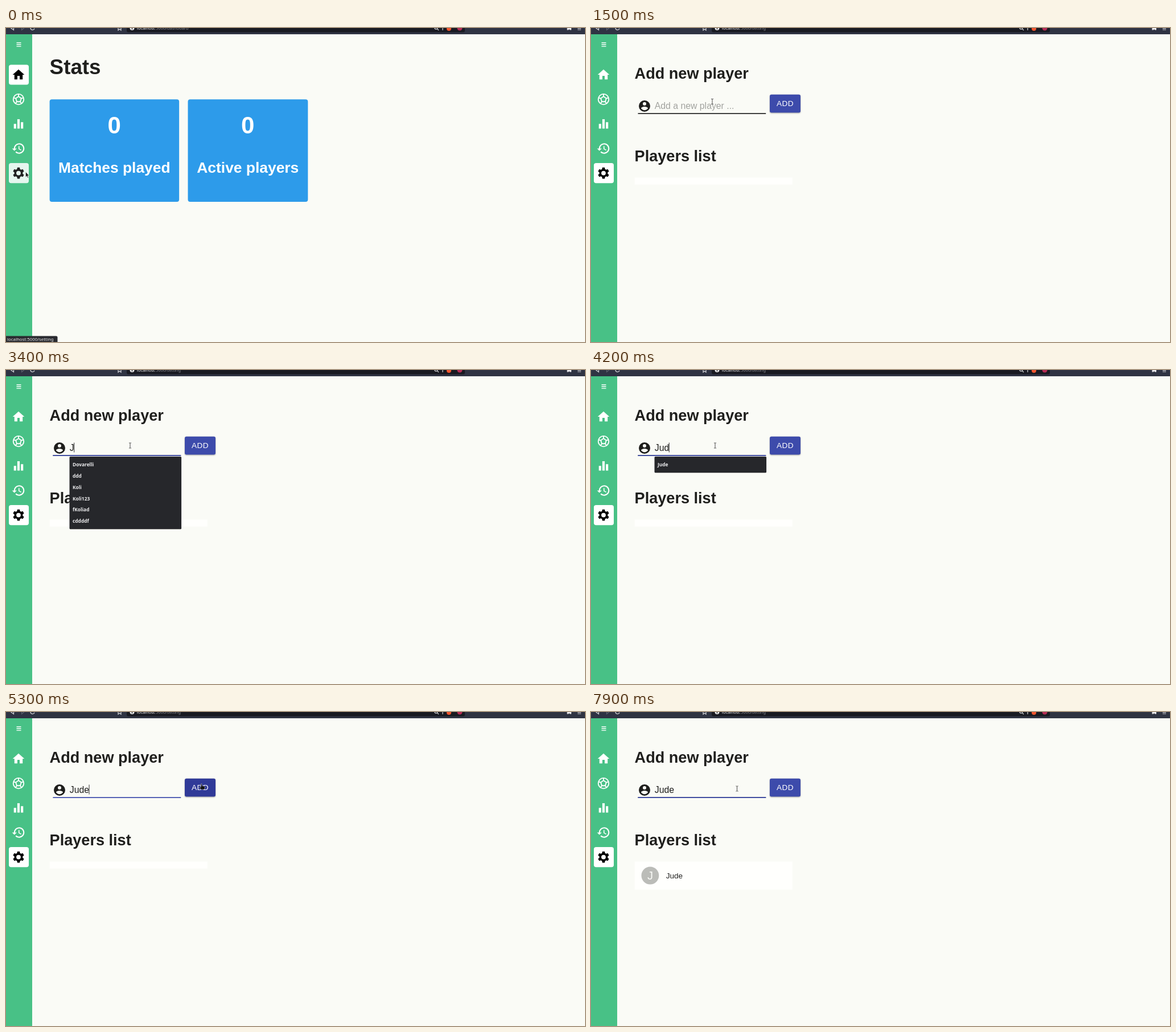
Animation of 1017x551 px, one loop 8 s. Source, as an HTML page:

```html
<!DOCTYPE html>
<html lang="en">
<head>
<meta charset="utf-8">
<title>Adding a player</title>
<style>
  html, body { margin: 0; width: 100%; height: 100%; overflow: hidden; background: #fafbf6; }
  svg { display: block; width: 1017px; height: 551px; }
  text { font-family: "Liberation Sans", Arial, sans-serif; fill: #1f1f1d; white-space: pre; }
  .ui { font-family: "Noto Sans", "Open Sans", sans-serif; }
  .bold { font-weight: 700; }
  .mid { text-anchor: middle; }
  #add { filter: drop-shadow(0 1.3px 1.3px rgba(0, 0, 0, .35)); }
</style>
</head>
<body>
<svg viewBox="0 0 1017 551" xmlns="http://www.w3.org/2000/svg">
  <defs>
    <clipPath id="addClip"><rect x="314" y="116.8" width="54" height="31.7" rx="3"/></clipPath>
  </defs>
  <rect width="1017" height="551" fill="#fafbf6"/>

  <g id="browser">
    <rect width="1017" height="11" fill="#2f3343"/>
    <path d="M212 0H806V4.500Q806 7.500 803 7.500H215Q212 7.500 212 4.500Z" fill="#191a22"/>
    <g fill="none" stroke="#d5d6da" stroke-width="1.200">
      <path d="M8.500 0L13.500 3.500V0"/>
      <path d="M32 0L27.500 3.500V0" stroke="#5b5f6c"/>
      <path d="M43 0A3.600 3.600 0 0 0 50 1"/>
      <path d="M197 0V4L199.500 2L202 4V0"/>
      <circle cx="755.500" cy="-.5" r="2.600"/>
      <path d="M757.500 1.500L760 4M767 0V4"/>
      <path d="M1004 .5H1010M1004 3H1010"/>
    </g>
    <circle cx="221.500" cy="0" r="4" fill="#e4e4e6"/>
    <path d="M221.500 0V2.500" stroke="#191a22" stroke-width="1.200"/>
    <text class="ui" x="230" y="3" font-size="7.400" style="fill:#f0f0f2">localhost<tspan id="path" fill="#85878f"></tspan></text>
    <circle cx="778" cy="1" r="4" fill="#f0562f"/>
    <circle cx="797" cy="0" r="4.500" fill="#b52c55"/>
    <path d="M985.500 0H993V3.500H990.500A1.300 1.300 0 0 0 988 3.500H985.500Z" fill="#e8e8ec"/>
  </g>

  <rect y="11" width="46" height="540" fill="#48c186"/>
  <path d="M18.500 26H26.500M18.500 29.200H26.500M18.500 32.400H26.500" stroke="#fff" stroke-width="1.400"/>
  <g id="nav"></g>

  <g id="stats">
    <text class="bold" x="76.600" y="81" font-size="36.800">Stats</text>
    <rect x="76.600" y="125.300" width="227.500" height="179.800" rx="4" fill="#2d9bea"/>
    <rect x="319.500" y="125.300" width="210.800" height="179.800" rx="4" fill="#2d9bea"/>
    <g class="bold mid">
      <text x="190.300" y="185" font-size="42" style="fill:#fff">0</text>
      <text x="424.800" y="185" font-size="42" style="fill:#fff">0</text>
      <text x="190.300" y="254" font-size="26.400" style="fill:#fff">Matches played</text>
      <text x="424.800" y="254" font-size="26.400" style="fill:#fff">Active players</text>
    </g>
  </g>

  <g id="setting">
    <text class="bold" x="76.600" y="88.500" font-size="27.100">Add new player</text>
    <path transform="translate(82 125)" fill="#1e1e1c" d="M12 2a10 10 0 1 0 0 20a10 10 0 1 0 0-20zm0 3a3 3 0 1 1 0 6a3 3 0 1 1 0-6zm0 14.200c-2.500 0-4.710-1.280-6-3.220.03-1.990 4-3.080 6-3.080 1.990 0 5.970 1.090 6 3.080-1.290 1.940-3.500 3.220-6 3.220z"/>
    <text id="field" x="111.800" y="141.500" font-size="15.800"></text>
    <rect id="caret" y="127.500" width="1" height="17" fill="#333"/>
    <rect id="line" x="82.500" width="224.700"/>
    <rect id="focus" y="149.300" height="1.700" fill="#3d4bab"/>
    <g id="add">
      <rect id="addBox" x="314" y="116.800" width="54" height="31.700" rx="3"/>
    </g>
    <g clip-path="url(#addClip)"><circle id="ripple" cx="344" cy="130" fill="#fff"/></g>
    <text class="mid" x="341" y="137" font-size="13.600" letter-spacing=".35" style="fill:#fff">ADD</text>

    <text class="bold" x="76.600" y="234.300" font-size="27.100">Players list</text>
    <rect id="list" x="76.600" y="262.300" width="277" fill="#fffffd"/>
    <g id="entry">
      <circle cx="103.900" cy="287" r="15.400" fill="#bbbcb8"/>
      <text id="initial" class="mid" x="104" y="294" font-size="20" style="fill:#fbfbf8"></text>
      <text id="entryName" x="131.800" y="291.600" font-size="13.500"></text>
    </g>
    <g id="menu"></g>
  </g>

  <g id="status">
    <path d="M0 540.500H88Q90.500 540.500 90.500 543V551H0Z" fill="#2a2b30"/>
    <text class="ui" x="2" y="549.300" font-size="7.850" style="fill:#e6e6e8">localhost:5000/setting</text>
  </g>

  <g id="cursor">
    <path id="arrow" d="M0 0V9.200L2.100 7.300L3.500 10.400L4.900 9.700L3.500 6.700H6.200Z" fill="#1b1b1b" stroke="#fff" stroke-width=".5"/>
    <path id="beam" d="M-2-4.500H-.6L0-4L.6-4.500H2M0-4V4M-2 4.500H-.6L0 4L.6 4.500H2" fill="none" stroke="#4a4a4a" stroke-width="1"/>
    <path id="hand" d="M-1.500-5Q0-5.800 .3-4V-1.500L4.500-.8Q5.500-.4 5.300 1L4.500 5H-1.500L-4.500 1.200Q-4.300-.2-2.800 .7L-1.800 1.200Z" fill="#111" stroke="#dfe0ee" stroke-width=".5"/>
  </g>
</svg>
<script>
const LOOP = 8000, STEP = 100;
const NAME = "Jude";
const SAVED = ["Dovarelli", "ddd", "Koli", "Koli123", "fKoliad", "cddddf"];
const $ = id => document.getElementById(id);
const set = (el, attrs) => { for (const k in attrs) el.setAttribute(k, attrs[k]); };
const show = (id, on) => set($(id), { visibility: on ? "visible" : "hidden" });
const within = (v, a, b) => v >= a && v < b;

// Value at time t along rows of [time, ...values], eased between rows.
function track(rows, t) {
  let i = 0;
  while (i < rows.length - 1 && rows[i + 1][0] <= t) i++;
  const a = rows[i], b = rows[i + 1] || a;
  const p = b === a ? 0 : Math.max(0, (t - a[0]) / (b[0] - a[0]));
  const e = p * p * (3 - 2 * p);
  return a.slice(1).map((v, k) => v + (b[k + 1] - v) * e);
}

function ringPoints(n, r, cx = 12, cy = 12) {
  return Array.from({ length: n }, (_, i) => {
    const a = i * 2 * Math.PI / n - Math.PI / 2;
    return [cx + r * Math.cos(a), cy + r * Math.sin(a)].map(v => v.toFixed(2));
  });
}

function gearPath() {
  const pts = [];
  for (let i = 0; i < 6; i++) {
    const a = i * Math.PI / 3, c = Math.cos(a), s = Math.sin(a);
    for (const [x, y] of [[-2.6, -6.7], [-2, -9.6], [2, -9.6], [2.6, -6.7]])
      pts.push((12 + x * c - y * s).toFixed(2) + " " + (12 + x * s + y * c).toFixed(2));
  }
  return `M${pts.join("L")}ZM12 8.2a3.8 3.8 0 1 0 0 7.6a3.8 3.8 0 1 0 0-7.6Z`;
}

function ballIcon() {
  const inner = ringPoints(5, 4.9), outer = ringPoints(5, 9);
  const spokes = inner.map((p, i) => `M${p}L${outer[i]}`).join("");
  return `<g fill="none" stroke="#fff" stroke-width="1.8"><circle cx="12" cy="12" r="9"/>
    <path d="M${inner.join("L")}Z${spokes}"/></g>`;
}

const icons = [
  `<path d="M10 20v-6h4v6h5v-8h3L12 3 2 12h3v8z"/>`,
  ballIcon(),
  `<path d="M10 20h4V4h-4zM4 20h4v-8H4zM16 9v11h4V9z"/>`,
  `<path d="M13 3a9 9 0 0 0-9 9H1l3.900 4L9 12H6a7 7 0 1 1 2.060 4.940l-1.420 1.420A9 9 0 1 0 13 3zm-1 5v5l4.280 2.540.72-1.210-3.500-2.080V8z"/>`,
  `<path fill-rule="evenodd" d="${gearPath()}"/>`
];
$("nav").innerHTML = icons.map((icon, i) => {
  const y = 82 + i * 43.15;
  return `<rect x="5" y="${y - 17.6}" width="35" height="35.2" rx="4" fill="#fff" fill-opacity="0"/>
    <g fill="#fff" transform="translate(22 ${y}) scale(1.03) translate(-12 -12)">${icon}</g>`;
}).join("");
const plates = $("nav").querySelectorAll("rect");
const glyphs = [...$("nav").children].filter(el => el.tagName === "g");

$("initial").textContent = NAME[0];
$("entryName").textContent = NAME;

let menuKey = "";
function drawMenu(items) {
  const key = items.join();
  if (key === menuKey) return;
  menuKey = key;
  $("menu").innerHTML =
    `<rect x="111.600" y="152" width="196.400" height="${8.4 + items.length * 19.8}" rx="1.5" fill="#26272b" stroke="#000" stroke-opacity=".15" stroke-width=".8"/>` +
    items.map((s, i) => `<text class="ui" x="117" y="${169.2 + i * 19.8}" font-size="8.4" font-weight="600" style="fill:#ececee">${s}</text>`).join("");
}

const pointer = [
  [0, 34.5, 252.5], [400, 34.5, 252.5], [700, 40.5, 250], [800, 40.5, 250],
  [1500, 213, 129], [1700, 213, 129], [2000, 218, 132.5], [5000, 218, 132.5],
  [5300, 344, 131], [5400, 344, 131], [5700, 346, 96], [5800, 346, 96],
  [6100, 345, 131.5], [6400, 345, 131.5], [6700, 304, 134],
  [7100, 256.5, 134.5]
];
const focusWidth = [
  [1600, 0], [1800, 1], [6100, 1], [6200, .3], [6300, .036], [6400, 0], [6800, 0], [7000, 1]
];
const typing = [3400, 3600, 4200, 4400];
const caretOn = [[1700, 2100], [2600, 3200], [3400, 4100], [4200, 4900], [5300, 5600], [6900, 7300]];
const gray = k => `rgb(${[0, 0, 0].map(() => Math.round(255 * k)).join()})`;

function draw(time) {
  const t = Math.floor(time / STEP) * STEP;
  const settings = t >= 500;
  const [x, y] = track(pointer, t);
  const inField = settings && within(x, 83, 308) && within(y, 118, 152);
  const inButton = settings && within(x, 314, 368) && within(y, 117, 149);

  show("stats", !settings);
  show("setting", settings);
  $("path").textContent = settings ? ":5000/setting" : ":5000/dashboard";
  show("status", t < 1300);

  const swap = Math.min(1, Math.max(0, (t - 400) / 300));
  set(plates[0], { "fill-opacity": 1 - swap });
  set(glyphs[0], { fill: gray(swap) });
  set(plates[4], { "fill-opacity": .86 + .14 * swap });
  set(glyphs[4], { fill: gray(.13 * (1 - swap)) });

  const typed = NAME.slice(0, typing.filter(k => k <= t).length);
  $("field").textContent = typed || "Add a new player ...";
  $("field").style.fill = typed ? "#1f1f1d" : "#a2a39f";
  const caretX = 111.3 + [0, .5, 1.056, 1.612, 2.168][typed.length] * 15.8;
  set($("caret"), { x: caretX });
  $("caret").style.display = settings && caretOn.some(([a, b]) => within(t, a, b)) ? "" : "none";

  set($("line"), inField
    ? { y: 149.3, height: 1.7, fill: "#222" }
    : { y: 150, height: .9, fill: "#8c8d89" });
  const [w] = track(focusWidth, t);
  set($("focus"), { x: 194.85 - 112.35 * w, width: 224.7 * w });

  set($("addBox"), { fill: inButton ? "#303a98" : "#3d4bab" });
  const p = (t - 6100) / 550;
  const live = within(p, 0, 1);
  set($("ripple"), { r: live ? 36 * p : 0, opacity: live ? .22 * (1 - p) : 0 });

  const added = t >= 6200;
  set($("list"), { height: added ? 49.5 : 12.5 });
  $("entry").style.display = added ? "" : "none";

  const fading = t >= 4500;
  drawMenu(t < 3500 ? SAVED : [NAME]);
  $("menu").style.display = within(t, 1900, 4800) ? "" : "none";
  set($("menu"), {
    opacity: fading ? .17 : 1,
    transform: fading ? "translate(210 166) scale(.957) translate(-210 -166)" : ""
  });

  set($("cursor"), { transform: `translate(${x.toFixed(1)} ${y.toFixed(1)})` });
  show("arrow", !inField && !inButton);
  show("beam", inField);
  show("hand", inButton);
}

const start = performance.now();
function tick(now) {
  draw(Math.max(0, now - start) % LOOP);
  requestAnimationFrame(tick);
}
draw(0);
requestAnimationFrame(tick);
</script>
</body>
</html>
```
